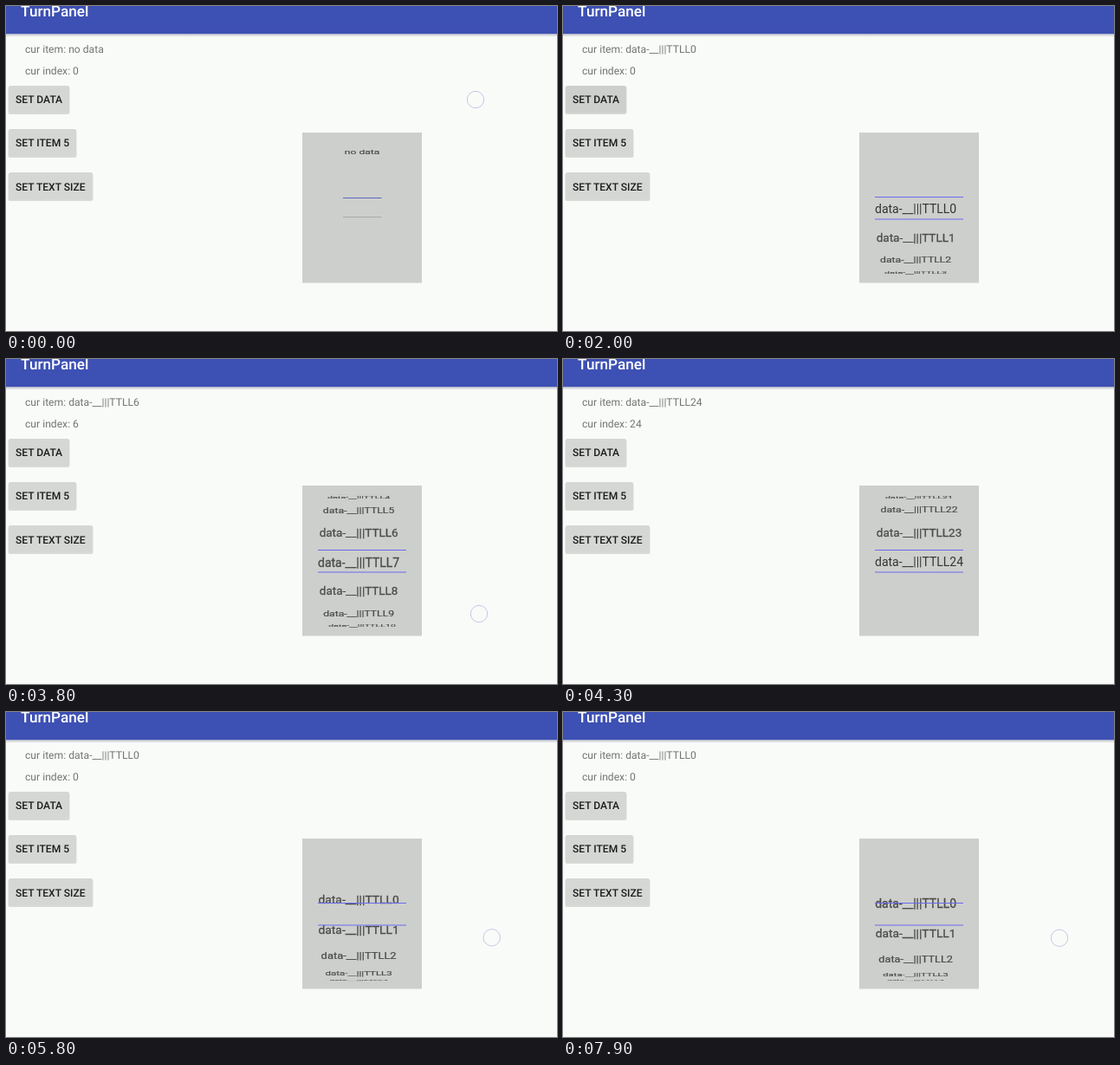
Recreate the animation shown at these times as an HTML page with a canvas. Size 636x375 px, loop 8000 ms.

```html
<!DOCTYPE html>
<html lang="en">
<head>
<meta charset="utf-8">
<title>Wheel picker demo</title>
<style>
  html, body { margin: 0; width: 100%; height: 100%; overflow: hidden; background: #f9fbf8; }
  svg, canvas { position: absolute; left: 0; top: 0; width: 636px; height: 375px; }
  text { font-family: Roboto, sans-serif; text-rendering: geometricPrecision; }
  .title { font-size: 17.2px; font-weight: 500; fill: #fff; }
  .status text { font-size: 12.15px; fill: #737573; }
  .buttons text { font-size: 12.1px; font-weight: 500; fill: #1c1d1c; }
  .buttons rect { fill: #d5d7d4; }
  .buttons .shade { fill: #b9bbb8; opacity: .5; }
  .buttons .pressed { fill: #cdcfcc; }
</style>
</head>
<body>
<svg viewBox="0 0 636 375">
  <defs>
    <linearGradient id="drop" x1="0" y1="0" x2="0" y2="1">
      <stop offset="0" stop-color="#8f95b0" stop-opacity=".75"/>
      <stop offset="1" stop-color="#c9ccd0" stop-opacity="0"/>
    </linearGradient>
  </defs>
  <rect y="32" width="636" height="4" fill="url(#drop)"/>
  <rect width="636" height="32" fill="#3d50b3"/>
  <text class="title" x="17" y="11.5">TurnPanel</text>
  <g class="status">
    <text id="item" x="22" y="54"></text>
    <text id="index" x="22" y="79"></text>
  </g>
  <g class="buttons">
    <rect class="shade" x="2.5" y="93" width="71" height="32" rx="2"/>
    <rect id="setData" x="3" y="92" width="70" height="31.5" rx="2"/>
    <text x="11" y="112.3">SET DATA</text>
    <rect class="shade" x="2.5" y="143" width="79" height="32" rx="2"/>
    <rect x="3" y="142" width="78" height="31.5" rx="2"/>
    <text x="11" y="162.3">SET ITEM 5</text>
    <rect class="shade" x="2.5" y="193" width="98" height="32" rx="2"/>
    <rect x="3" y="192" width="97" height="31.5" rx="2"/>
    <text x="11" y="212.8">SET TEXT SIZE</text>
  </g>
  <rect x="342" y="146" width="138" height="173.5" fill="#cdcfcc"/>
</svg>
<canvas id="stage" width="636" height="375"></canvas>
<script>
const LOOP = 8000, TICK = 100, DATA_AT = 1800;
const LAST = 24, PITCH = 34, STEP = Math.PI / 8, RADIUS = 89, MIDDLE = 233;
const ctx = document.getElementById('stage').getContext('2d');
const itemText = document.getElementById('item');
const indexText = document.getElementById('index');
const setData = document.getElementById('setData');

// The finger goes down, speeds up and lifts; the wheel then glides until it
// rests at position `end`, and the status shows that item from `pick` on.
const gestures = [
  { down: 0, lift: 500, rest: 900, from: [542, 108], to: [595, 368], end: 0, pick: 900 },
  { down: 1500, lift: 1800, rest: 1900, from: [40, 108], to: [40, 108], end: 0, pick: 1900 },
  { down: 2400, lift: 2900, rest: 3200, from: [556, 324], to: [570, 240], end: 6, pick: 3300 },
  { down: 3500, lift: 4100, rest: 4300, from: [531, 327], to: [591, 195], end: 24, pick: 4300 },
  { down: 4500, lift: 4700, rest: 4900, from: [584, 185], to: [591, 291], end: -.13, pick: 5500 },
  { down: 5400, lift: 5900, rest: 6200, from: [555, 282], to: [564, 248], end: 1, pick: 6200 },
  { down: 6300, lift: 6800, rest: 7000, from: [582, 231], to: [571, 278], end: 0, pick: 7000 },
  { down: 7200, lift: 8000, rest: 8100, from: [573, 273], to: [573, 257], end: 0, pick: 8100 }
];
const FIRST_POS = 2.21;

const label = i => 'data-__|||TTLL' + i;
const mix = (a, b, k) => a + (b - a) * k;
const progress = (t, a, b) => Math.min(1, Math.max(0, (t - a) / (b - a)));

function touchAt(g, t) {
  const k = progress(t, g.down, g.lift) ** 2;
  return g.from.map((v, i) => mix(v, g.to[i], k));
}

function wheelAt(t) {
  const n = gestures.findLastIndex(g => g.down <= t), g = gestures[n];
  const start = n ? gestures[n - 1].end : FIRST_POS;
  const dragged = start + (g.from[1] - touchAt(g, t)[1]) / PITCH;
  const glide = 1 - (1 - progress(t, g.lift, g.rest)) ** 2;
  return mix(dragged, g.end, glide);
}

function drawItem(text, offset, left, size, depth) {
  const angle = offset * STEP;
  if (Math.abs(angle) >= Math.PI / 2) return;
  const cos = Math.cos(angle);
  const scale = 1 / (1 + depth * (1 - cos));
  const resting = Math.abs(offset) < .01;
  ctx.save();
  ctx.font = size + 'px Roboto, sans-serif';
  const half = ctx.measureText(text).width / 2;
  ctx.translate(left + half, MIDDLE + RADIUS * Math.sin(angle) * scale ** .4);
  ctx.scale(scale, scale * cos);
  ctx.fillStyle = ctx.strokeStyle = resting ? '#343534' : '#4a4b49';
  ctx.fillText(text, -half, 5.7);
  if (!resting) {
    ctx.lineWidth = .3;
    ctx.strokeText(text, -half, 5.7);
  }
  ctx.restore();
}

function drawLine(x, y, width, color) {
  ctx.fillStyle = color;
  ctx.fillRect(x, y, width, 1);
}

function drawWheel(t) {
  const pos = wheelAt(t);
  const empty = t < DATA_AT;
  ctx.save();
  ctx.beginPath();
  ctx.rect(342, 154, 138, 156.5);
  ctx.clip();
  if (empty) {
    drawItem('no data', -pos, 389, 13.2, .26);
  } else {
    const from = Math.max(0, Math.ceil(pos - 4)), to = Math.min(LAST, Math.floor(pos + 4));
    for (let i = from; i <= to; i++) drawItem(label(i), i - pos, 360, 14, .5);
  }
  ctx.restore();
  if (empty) {
    drawLine(389, 221, 44.5, '#5b66c4');
    drawLine(389, 243, 44.5, '#a9aba8');
  } else {
    drawLine(360, 220, 102, '#6a6af0');
    drawLine(360, 245.5, 102, '#6a6af0');
  }
}

// The mark lingers faintly for one tick after the finger lifts
function drawTouch(t) {
  const g = gestures.find(g => t >= g.down && t <= g.lift + TICK);
  if (!g) return;
  ctx.globalAlpha = t > g.lift ? .35 : 1;
  ctx.beginPath();
  ctx.arc(...touchAt(g, t), 9.7, 0, 2 * Math.PI);
  ctx.lineWidth = 1;
  ctx.strokeStyle = '#c5c6e8';
  ctx.stroke();
  ctx.globalAlpha = 1;
}

function setText(node, value) {
  if (node.textContent !== value) node.textContent = value;
}

function render(now) {
  const t = Math.floor(now % LOOP / TICK) * TICK;
  const picked = gestures.findLast(g => g.pick <= t);
  const index = picked ? Math.abs(Math.round(picked.end)) : 0;
  setText(itemText, 'cur item: ' + (t < DATA_AT ? 'no data' : label(index)));
  setText(indexText, 'cur index: ' + index);
  setData.classList.toggle('pressed', t >= 1600 && t < 2200);
  ctx.clearRect(0, 0, 636, 375);
  drawWheel(t);
  drawTouch(t);
}

let start;
function frame() {
  const now = performance.now();
  start ??= now;
  render(now - start);
  requestAnimationFrame(frame);
}
frame();
</script>
</body>
</html>
```
